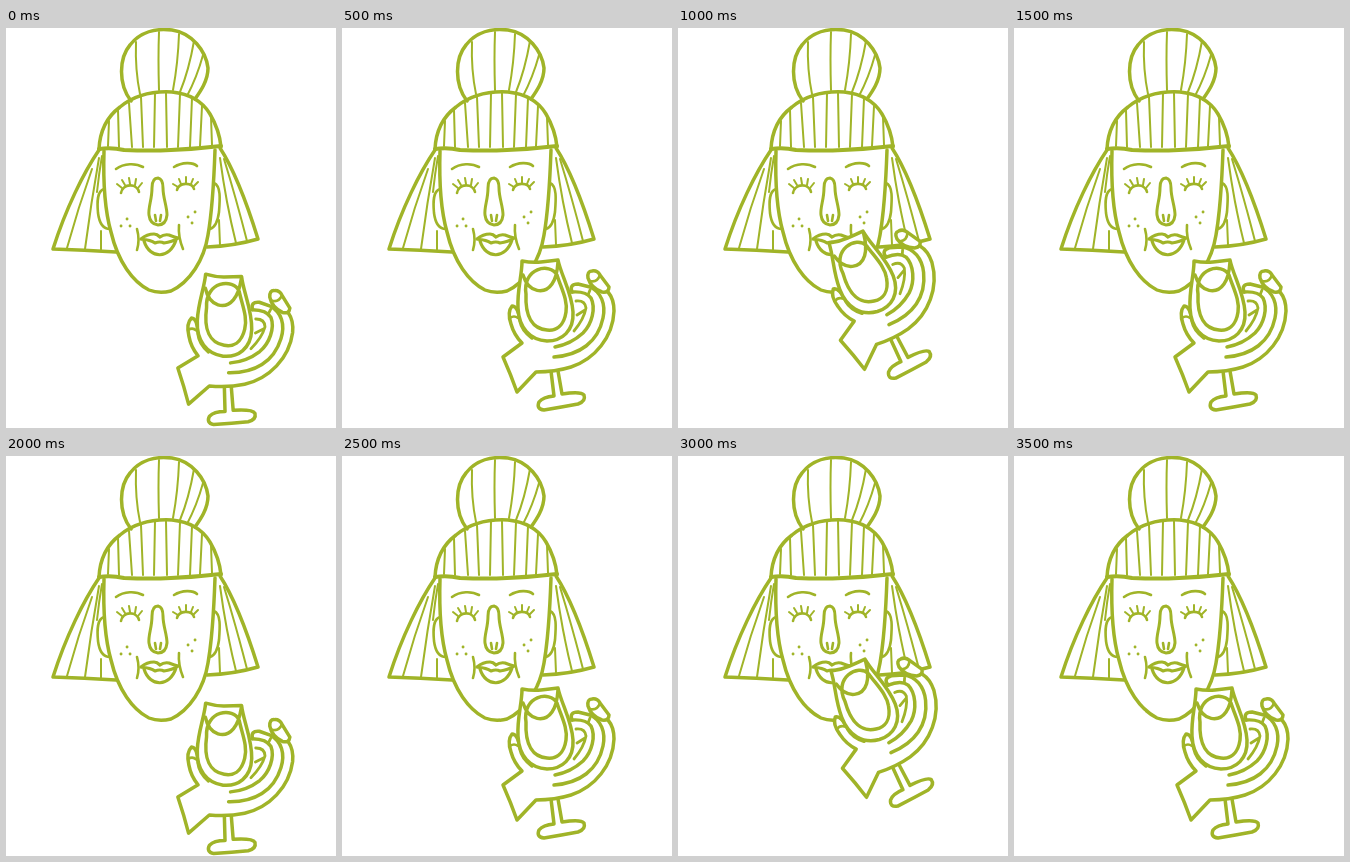
Write an HTML page that moves like this. It is 330x400 px and loops after 4000 ms.

```html
<!DOCTYPE html>
<html lang="en">
<head>
<meta charset="utf-8">
<title>Cheers</title>
<style>
  html, body { margin: 0; width: 100%; height: 100%; overflow: hidden; background: #fff; }
  svg { display: block; width: 330px; height: 400px; }
  path { fill: none; stroke: #a0b428; stroke-width: 3.5; stroke-linecap: round; stroke-linejoin: round; }
  .thin path { stroke-width: 2; }
  .mid path { stroke-width: 2.6; }
  .solid { fill: #fff; }
  .mask { fill: #fff; stroke: none; }
</style>
</head>
<body>
<svg viewBox="0 0 330 400">
  <g id="hair">
    <path d="M125 73C112 56 113 30 124 17C134 4 150 0 166 2C186 5 200 23 202 40C202 53 194 64 189 71"/>
    <path d="M93 121C94 101 102 88 114 79C130 66 148 63 166 64C186 66 198 76 204 86C211 98 214 108 215 119"/>
    <path style="stroke-width:4" d="M93 121Q105 119 118 122Q145 123 165 122Q190 121 215 118"/>
    <path d="M93 122C78 144 60 180 47 221Q78 222 110 224"/>
    <path d="M214 120C229 143 243 182 252 211Q228 218 201 219"/>
    <g class="thin">
      <path d="M130 14Q129 42 134 66M153 4Q152 30 153 62M173 6Q172 35 167 62M188 13Q183 42 174 64M197 27Q191 49 181 68"/>
      <path d="M103 93L102 118M112 82L113 119M123 75L126 119M135 69L137 119M149 65L148 119M160 65L161 119M174 66L172 119M186 70L184 119M196 78L194 118M205 89L206 117"/>
      <path d="M86 141Q72 180 61 220M93 130Q85 175 79 221M96 128Q93 145 91 164M95 203L95 222"/>
      <path d="M218 131Q230 170 241 213M214 130Q220 175 230 215M213 192L214 217"/>
    </g>
  </g>
  <g id="face">
    <path d="M98 123C97 155 99 183 105 204C112 234 127 254 143 262Q153 266 165 263C184 254 198 232 202 207C206 184 208 151 209 122"/>
    <g class="mid">
      <path d="M98 161C91 163 91 174 92 185Q94 201 104 201M208 155C215 158 214 171 213 184Q211 199 204 201"/>
      <path d="M110 141C118 135 130 135 137 139M168 139C176 134 187 134 191 138"/>
      <path d="M115 165C117 155 131 155 133 164M171 162C173 154 186 154 188 161"/>
      <path d="M149 187L150 193M155 187L154 193"/>
      <path style="stroke-width:3" d="M143 187C142 179 146 172 146 160Q146 150 152 150Q157 151 157 160C157 170 161 178 161 187Q160 197 152 197Q144 196 143 187"/>
      <path d="M131 201Q134 212 131 222M173 197Q172 209 177 221"/>
      <path style="stroke-width:3.2" d="M135 211Q141 206 148 206Q151 206 154 209Q158 206 163 207Q168 209 172 210M135 211Q145 212 149 215Q154 213 158 215Q166 214 172 210M138 213C144 232 164 231 170 212"/>
    </g>
    <g class="thin">
      <path d="M111 156L116 160M116 152L119 157M123 150L124 156M130 151L129 157M136 155L132 160"/>
      <path d="M167 156L172 159M173 151L175 156M180 149L180 155M187 151L185 156M192 154L187 159"/>
    </g>
    <path style="stroke-width:2.8" d="M121 191h.1M115 198h.1M124 198h.1M182 189h.1M189 184h.1M186 195h.1"/>
  </g>
  <g id="hand">
    <path class="solid" d="M209 343L212 368Q201 369 197 374Q194 381 202 382Q220 379 236 376Q244 373 242 367Q239 363 220 366L216 343"/>
    <path class="mask" d="M168 292L170 278L177 286L182 300L230 262L236 256L254 259L266 262L272 276C270 310 250 332 229 339Q210 344 194 344L175 364L161 329L180 315Z"/>
    <path d="M190 310Q180 303 178 293Q176 278 170 278Q165 284 169 296Q172 307 180 315L161 329Q169 347 175 364L194 344Q213 344 229 339C253 331 271 309 272 283Q272 271 266 264"/>
    <path class="solid" d="M246 250Q245 243 250 243Q255 242 258 247L267 259Q267 265 260 264Q249 260 246 250Z"/>
    <path style="stroke-width:2.6" d="M168 290Q172 287 176 290M248 253Q255 255 258 247"/>
    <path d="M230 264Q227 256 236 256L248 259C259 264 264 276 261 290C256 314 238 327 212 329"/>
    <path d="M230 264Q244 263 249 270C254 280 250 296 241 305Q229 316 213 319"/>
    <path style="stroke-width:2.8" d="M234 273Q243 272 244 280Q242 291 232 303M248 262L246 267M243 282L235 287"/>
    <path class="solid" d="M180 233Q190 235 199 234Q208 233 216 232C219 247 230 265 231 284C232 303 220 313 205 313C188 312 177 300 176 280C175 262 180 248 180 233Z"/>
    <path d="M184 266C180 240 208 234 215 247C219 260 226 272 224 284C222 298 214 303 205 302C191 301 183 289 184 266M181 247C187 266 203 266 210 256Q215 249 216 234"/>
  </g>
</svg>
<script>
  const STEP = 500;

  // shift x, shift y, tilt in degrees
  const near = [0, 0, 0];
  const low = [13, 15.5, 5.3];
  const sip = [-8.7, -30, -17.9];
  const shift = ([x, y, a], dx, dy) => [x + dx, y + dy, a];

  const poses = [
    low, near, sip, near,
    shift(low, 0, 1), near, shift(sip, 2, 0), shift(near, 2, 0)
  ];

  const hand = document.getElementById('hand');
  const start = performance.now();

  function draw() {
    const step = Math.floor((performance.now() - start) / STEP);
    const [x, y, a] = poses[step % poses.length];
    hand.setAttribute('transform', `translate(${x} ${y}) rotate(${a} 208.2 303.5)`);
    requestAnimationFrame(draw);
  }
  draw();
</script>
</body>
</html>
```
